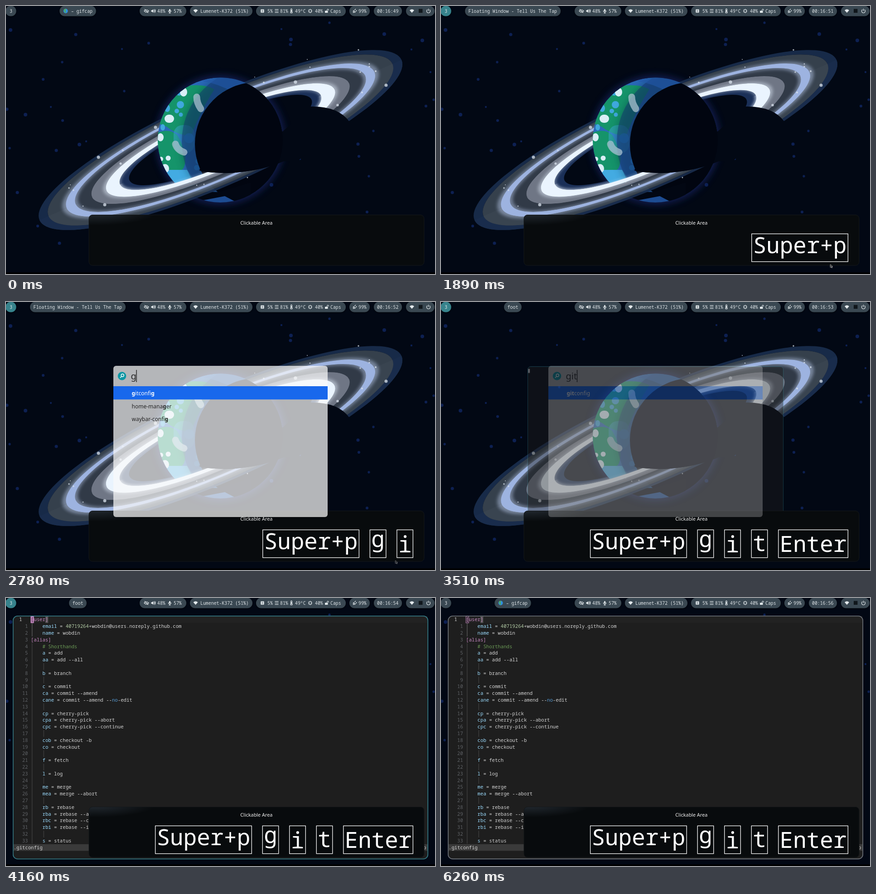
An HTML page for the animation above (6.34 s loop, 947 by 592 pixels).

```html
<!DOCTYPE html>
<html lang="en">
<head>
<meta charset="utf-8">
<title>Launcher demo</title>
<style>
  html, body { margin: 0; width: 100%; height: 100%; overflow: hidden; background: #020713; }
  svg { display: block; width: 947px; height: 592px; }
  text { white-space: pre; }
  .bar { font: 9.9px "Noto Sans Mono", monospace; fill: #dfe5e8; }
  .pill { fill: #3a4852; filter: drop-shadow(0 1px 1.5px #0009); }
  .icon { fill: none; stroke: #e3e9ec; stroke-width: 1.2; }
  .solid { fill: #e3e9ec; stroke: none; }
  .code { font: 10.67px "Noto Sans Mono", monospace; fill: #d4d4d4; }
  .key { font: 49.2px "Noto Sans Mono", monospace; fill: #fff; }
  .sans { font-family: "Noto Sans", sans-serif; }
  #editor { transform-origin: 473.5px 308px; }
</style>
</head>
<body>
<svg id="stage" viewBox="0 0 947 592" xmlns="http://www.w3.org/2000/svg">
  <defs>
    <filter id="soft" x="-30%" y="-30%" width="160%" height="160%"><feGaussianBlur stdDeviation="9"/></filter>
    <filter id="haze" x="-10%" y="-30%" width="120%" height="160%"><feGaussianBlur stdDeviation="3.5"/></filter>
    <clipPath id="disc"><circle cx="473" cy="296" r="138"/></clipPath>
    <clipPath id="near"><rect x="-450" y="0" width="900" height="120"/></clipPath>
    <path id="shade" d="M427 363Q437 368 490 369Q560 366 613 343L640 345L759 257Q735 221 672 222L611 277L480 260Z"/>
    <radialGradient id="sheen" gradientUnits="userSpaceOnUse" cx="195" cy="458" r="135" gradientTransform="translate(0 366) scale(1 .2)">
      <stop offset="0" stop-color="#232a31"/><stop offset="1" stop-color="#232a31" stop-opacity="0"/>
    </radialGradient>
  </defs>

  <g id="wallpaper">
    <rect width="947" height="592" fill="#020814"/>
    <g id="stars" fill="#0d2052"/>
    <circle cx="473" cy="296" r="141" fill="#1b2a78" opacity=".7" filter="url(#soft)"/>
    <g id="far" transform="translate(473.5 296) rotate(-23.9)"/>
    <g clip-path="url(#disc)">
      <circle cx="473" cy="296" r="138" fill="#2a69b8"/>
      <path d="M335 260Q365 180 400 176Q440 172 460 184Q430 230 408 288Q380 284 362 272Q350 262 335 260Z" fill="#15946a"/>
      <path d="M330 282Q360 268 378 285Q405 330 392 358Q380 374 360 366Q342 350 330 330Z" fill="#15946a"/>
      <path d="M340 362L400 362L440 420L370 400Z" fill="#43abe2"/>
      <g fill="#3fa8de">
        <circle cx="385" cy="218" r="8"/><circle cx="377" cy="232" r="5"/><circle cx="386" cy="240" r="4.5"/>
        <ellipse cx="356" cy="226" rx="6" ry="8"/><ellipse cx="346" cy="268" rx="5" ry="7"/><circle cx="382" cy="192" r="6"/>
        <rect x="370" y="263" width="46" height="62" rx="20" opacity=".45"/>
      </g>
      <circle cx="553" cy="300" r="166" fill="#08303f" opacity=".4" filter="url(#soft)"/>
      <circle cx="553" cy="300" r="165" fill="#11346f" opacity=".5"/>
      <path d="M434 166Q470 150 550 168V190H500Q470 172 434 166Z" fill="#2258a8" opacity=".6"/>
      <g fill="#1b5693" opacity=".7">
        <circle cx="404" cy="292" r="11"/><circle cx="424" cy="343" r="6"/><circle cx="421" cy="357" r="6"/>
      </g>
      <g fill="#d9eef6">
        <ellipse cx="392" cy="190" rx="8" ry="10"/><rect x="350" y="240" width="21" height="18" rx="9"/>
        <ellipse cx="341" cy="290" rx="7" ry="9"/><circle cx="358" cy="336" r="5.5"/>
        <ellipse cx="351" cy="359" rx="9" ry="10"/><circle cx="342" cy="338" r="5"/>
      </g>
      <g fill="none" stroke="#a9c0cf" stroke-linecap="round" stroke-width="15" opacity=".75">
        <path d="M421 201Q421 214 430 227"/><path d="M374 305Q378 318 393 323"/>
      </g>
      <circle cx="554" cy="305" r="137" fill="#010510"/>
      <path d="M370 409L470 411L540 390V450H370Z" fill="#020713"/>
      <path d="M425 431L483 420L508 433Q470 444 425 431Z" fill="#1d4c92"/>
    </g>
    <g id="front" clip-path="url(#near)" transform="translate(473.5 296) rotate(-23.9)"/>
    <use href="#shade" fill="#020814"/>
    <use href="#shade" fill="#010510" clip-path="url(#disc)"/>
    <g id="moons" fill="#dbe4ee"/>
    <rect y="588.5" width="947" height="4" fill="#000"/>
  </g>

  <g id="editor">
    <rect x="15.8" y="39.8" width="915.4" height="536.6" rx="10" fill="#1e1e1e"/>
    <rect id="boot" x="17" y="48" width="6.4" height="14.5" fill="#ccc"/>
    <g id="buffer" class="code"></g>
    <rect id="frame" x="15.8" y="39.8" width="915.4" height="536.6" rx="10" fill="none" stroke-width="1.6"/>
  </g>

  <g id="bar" class="bar"></g>

  <rect x="183" y="461.5" width="740" height="111.5" rx="8" fill="#080b0d"/>
  <rect x="183" y="461.5" width="740" height="111.5" rx="8" fill="url(#sheen)" stroke="#15181a"/>
  <text class="sans" x="552.8" y="483" font-size="10.8" text-anchor="middle" fill="#f2f2f2">Clickable Area</text>
  <g id="keys"></g>

  <g id="launcher" class="sans">
    <rect x="237" y="141" width="473" height="334" rx="6" fill="#fafafa" fill-opacity=".72"/>
    <circle cx="256" cy="163.5" r="9.3" fill="#0c96a4"/>
    <g fill="none" stroke="#fff" stroke-width="1.4"><circle cx="257.2" cy="162" r="3"/><path d="M255 164.4L251.8 167.6"/></g>
    <g id="results"></g>
  </g>

  <path id="mouse" d="M0 0V6.5L1.7 5L3 7.5L4.2 7L3 4.6H5Z" fill="#111" stroke="#ddd" stroke-width=".8"/>
</svg>

<script>
const LOOP = 6340;
const $ = id => document.getElementById(id);

// Wallpaper
const stars = [608,51, 629,74, 628,85, 315,82, 124,124, 256,95, 10,53, 154,63, 82,162, 261,188,
  99,223, 43,240, 2,228, 125,253, 8,314, 177,299, 162,306, 111,319, 927,221, 944,207, 937,146,
  919,76, 777,305, 779,332, 811,276, 649,338, 586,395, 25,412, 797,455, 801,376, 895,96, 835,62,
  118,524, 70,486, 714,37];
const moons = [204,334,3.5, 218,439,3.5, 330,268,3.5, 639,168,3.7, 839,175,3.5, 732,219,2.8, 569,169,2,
  816,144,2, 782,146,1.7, 786,191,2, 802,128,1.4, 802,134,1.8, 778,97,1.7, 549,157,1, 253,348,2.6,
  258,319,1.8, 142,395,1, 139,402,1.7, 149,407,1.7, 170,442,1.3, 437,394,1.4, 421,396,1.3,
  408,389,1, 533,379,1.4, 671,135,1.3, 665,118,1];
const dot = (x, y, r) => `<circle cx="${x}" cy="${y}" r="${r}"/>`;

let dots = '';
for (let i = 0; i < stars.length; i += 2) dots += dot(stars[i], stars[i + 1], 2.2 + i * 7 % 5 * .45);
$('stars').innerHTML = dots;
dots = '';
for (let i = 0; i < moons.length; i += 3) dots += dot(moons[i], moons[i + 1], moons[i + 2]);
$('moons').innerHTML = `<g opacity=".75">${dots}</g>`;

const oval = k => {
  const a = 437 * k, b = 98.7 * k;
  return `M${-a} 0A${a} ${b} 0 1 1 ${a} 0A${a} ${b} 0 1 1 ${-a} 0Z`;
};
const band = (outer, inner, fill, more = '') =>
  `<path d="${oval(outer)}${oval(inner)}" fill-rule="evenodd" fill="${fill}" ${more}/>`;
const rings = band(1, .95, '#1a2d4d', 'opacity=".92"') + band(.95, .85, '#3a4551', 'opacity=".92"') +
  band(.8, .71, '#313a47') + band(.71, .63, '#6f7685') +
  band(.87, .785, '#a9b9d8', 'opacity=".55" filter="url(#haze)"') + band(.645, .55, '#dfeaf8', 'opacity=".5" filter="url(#haze)"') +
  band(.85, .8, '#9db3e0') + band(.63, .555, '#eaf4fe');
$('far').innerHTML = band(.555, .503, '#1a2f57') + rings;
$('front').innerHTML = rings;

// Top bar
const CH = 5.94;
const pill = (x, right, more = '') =>
  `<rect class="pill" x="${x}" y="-.3" width="${right - x}" height="22.8" rx="11.3" ${more}/>`;
const label = (x, s) => `<text x="${x}" y="14.6">${s}</text>`;
const line = (x, d, cls = '') => `<path class="icon ${cls}" transform="translate(${x} 11)" d="${d}"/>`;
const wifi = x => line(x, 'M-5 -1.5Q0 -6 5 -1.5L0 4Z', 'solid');
const bolt = 'M-4 4L-2 2M-2.5 -1L1 2.5Q-1 4 -2.8 2.2T-2.5 -1ZM-.5 -2L2 -4.5M2 1L4.5 -1.5';

$('bar').innerHTML =
  pill(-1, 22.5, 'id="space"') + label(8, '3') + '<g id="title"></g>' +
  pill(295, 398) + line(310, 'M-5 0Q0 -5.5 5 0Q0 5.5 -5 0ZM-4 -4L4 4M-1 0H1.5') +
  line(325, 'M-4.5 -1.7H-2.2L.5 -4.2V4.2L-2.2 1.7H-4.5Z', 'solid') + line(325, 'M2 -2Q4 0 2 2M3 -4Q6.5 0 3 4') + label(334, '48%') +
  line(361.5, 'M-1.6 -3Q0 -6 1.6 -3V0Q0 2.5 -1.6 0Z', 'solid') + line(361.5, 'M-3 -1Q-3 2.5 0 2.5T3 -1M0 2.5V4.5M-2 4.7H2') + label(370, '57%') +
  pill(406, 544) + wifi(418.5) + label(429, 'Lumenet-K372 (51%)') +
  pill(552, 750) + line(566, 'M-3 -3H3V3H-3ZM-4 -1.5H4M-4 1.5H4M-1.5 -4V4M1.5 -4V4') + label(577, '5%') +
  line(597.5, 'M-4 -3.3H4M-4 0H4M-4 3.3H4') + label(605, '81%') +
  line(630, 'M-1.3 1V-4Q0 -6 1.3 -4V1Q2.8 3 1.3 4.5H-1.3Q-2.8 3 -1.3 1ZM0 -2V3') + label(638, '49°C') +
  line(671.5, 'M-3 0A3 3 0 1 1 3 0A3 3 0 1 1 -3 0M-4.7 0H-3M3 0H4.7M0 -4.7V-3M0 3V4.7M-3.4 -3.4L-2.2 -2.2M2.2 2.2L3.4 3.4M3.4 -3.4L2.2 -2.2M-2.2 2.2L-3.4 3.4') + label(682, '40%') +
  line(708, 'M-4 -.5H2.5V4H-4Z', 'solid') + line(708, 'M.8 0V-2.5Q2.5 -6 4.2 -2.5V-1') + label(716, 'Caps') +
  pill(758, 803) + line(770, bolt) + label(778, '99%') +
  pill(812, 874) + '<text id="clock" x="819" y="14.6"></text>' +
  pill(883, 946) + wifi(896) + '<rect x="911" y="6.5" width="8.5" height="8.5" fill="#10161b"/>' +
  line(932.5, 'M-2.3 -3A4 4 0 1 0 2.3 -3M0 -5V0');

function drawTitle(s) {
  const globe = s.startsWith('–');
  const w = (s.length + (globe ? 3 : 0)) * CH + 15, x = 158.5 - w / 2;
  const icon = `<circle cx="131.7" cy="11" r="4.9" fill="#2f8fe0"/>
    <path d="M128 8Q131 5.5 133 7.5L131 10L132.5 13L131 15.5Q128 12 128 8Z" fill="#4fae5a"/>`;
  $('title').innerHTML = pill(x, x + w) + (globe ? icon : '') + label(x + 7.5 + (globe ? 3 * CH : 0), s);
}

// Editor
const ADV = 6.402, ROW = 14.8, LEFT = 55;
const user = 'wobdin';
const rows = `[user]|email = 40719264+${user}@users.noreply.github.com|name = ${user}|[alias]|# Shorthands|a = add|aa = add --all||b = branch||c = commit|ca = commit --amend|cane = commit --amend --no-edit||cp = cherry-pick|cpa = cherry-pick --abort|cpc = cherry-pick --continue||cob = checkout -b|co = checkout||f = fetch||l = log||me = merge|mea = merge --abort||rb = rebase|rba = rebase --abort|rbc = rebase --continue|rbi = rebase --interactive||s = status`.split('|');
const tint = (s, fill) => `<tspan fill="${fill}">${s}</tspan>`;

function paint(s) {
  if (s[0] === '[') return tint(s, '#c586c0');
  if (s[0] === '#') return tint(s, '#6a9955');
  const [key, value] = s.split(' = ');
  return tint(key, '#9cdcfe') + ' = ' +
    value.replace(/^\d+/, n => tint(n, '#b5cea8')).replace('--no', '--' + tint('no', '#569cd6'));
}

const guide = (x, y, h, c = '#4a4a4a') => `<rect x="${x}" y="${y}" width="1" height="${h}" fill="${c}"/>`;
let buf = '<rect x="55" y="40.6" width="875" height="14.6" fill="#222"/>' +
  guide(57.3, 55.5, 29.5, '#707070') + guide(57.3, 99.5, 443) +
  `<rect x="${LEFT + 5 * ADV}" y="40.6" width="6.4" height="14.6" fill="#515151"/>` +
  '<rect id="caret" x="55" y="40.6" width="6.2" height="14.4" stroke="#c586c0" stroke-width=".9"/>';
rows.forEach((s, i) => {
  const y = 51.4 + ROW * i;
  buf += i ? `<text x="48.6" y="${y}" text-anchor="end" fill="#5f6266">${i}</text>`
           : `<text x="29.2" y="${y}" fill="#d0d0d0">1</text>`;
  if (s) buf += `<text x="${LEFT + (s[0] === '[' ? 0 : 4 * ADV)}" y="${y}">${paint(s)}</text>`;
  else buf += guide(82.8, y - 11, ROW);
});
buf += '<text id="bracket" x="55" y="51.4">[</text>' +
  '<rect x="16.6" y="543.8" width="913.8" height="14.6" fill="#3a3a3a"/>' +
  '<text x="16.8" y="554.8">.gitconfig</text><text x="927.3" y="554.8" text-anchor="end">Top</text>';
$('buffer').innerHTML = buf;

// Pressed keys, right aligned, each glyph run centred on its ink
const baseline = { 'Super+p': 545.5, g: 541, i: 553, t: 550, Enter: 551.7 };
function drawKeys(list) {
  let right = 898.4, out = '';
  for (const k of list.split(' ').filter(Boolean).reverse()) {
    const w = k.length * 29.52 + 6, x = right - w;
    out += `<rect x="${x}" y="503.3" width="${w}" height="61.4" fill="none" stroke="#fff" stroke-width="1.3"/>
      <text class="key" x="${x + 3}" y="${baseline[k]}">${k}</text>`;
    right = x - 24;
  }
  $('keys').innerHTML = out;
}

// Launcher
const entries = ['gitconfig', 'home-manager', 'waybar-config'];
const caretX = { '': 276.5, g: 288, gi: 293.5, git: 300.5 };
function drawResults(q) {
  const hits = entries.filter(e => e.includes(q));
  const mark = e => !q ? e : e.split(q).join(`<tspan font-weight="700">${q}</tspan>`);
  $('results').innerHTML =
    `<text x="275.5" y="171" font-size="20" fill="#2b2b2b">${q}</text>` +
    `<rect x="${caretX[q] - .7}" y="150" width="1.4" height="27" fill="#1c1c1c"/>` +
    '<rect x="237" y="186" width="473" height="29.3" fill="#1868ec"/>' +
    hits.map((e, i) => `<text x="277.5" y="${205.7 + 28.8 * i}" font-size="12" fill="${i ? '#262626' : '#fff'}">${mark(e)}</text>`).join('');
}

// Hard changes: each track is a list of [time, value]
const floating = 'Floating Window - Tell Us The Tap';
const tracks = [
  [drawTitle, [[0, '– gifcap'], [680, floating], [3465, 'foot'], [4980, floating], [5140, '– gifcap']]],
  [s => $('clock').textContent = '00:16:' + s,
    [[0, 49], [180, 50], [1140, 51], [2130, 52], [2940, 53], [4000, 54], [4980, 55], [5940, 56]]],
  [drawKeys, [[0, ''], [1890, 'Super+p'], [2690, 'Super+p g'], [2780, 'Super+p g i'],
    [2940, 'Super+p g i t'], [3440, 'Super+p g i t Enter']]],
  [drawResults, [[0, ''], [2780, 'g'], [2940, 'gi'], [3020, 'git']]],
  [on => { $('buffer').style.display = on ? '' : 'none'; $('boot').style.display = on ? 'none' : ''; },
    [[0, false], [3640, true]]],
  [solid => {
    $('caret').setAttribute('fill', solid ? '#c586c0' : 'none');
    $('bracket').setAttribute('fill', solid ? '#1e1e1e' : '#c586c0');
  }, [[0, true], [5380, false]]],
  [o => $('mouse').style.opacity = o, [[0, 0], [680, 1], [2130, .65], [3440, 0]]],
];

// Smooth changes: [time, value, easing to the next point]
const POP = 'cubic-bezier(.05,.9,.1,1.05)', FADE = 'cubic-bezier(0,.75,.15,1)';
function tween(id, prop, pts) {
  const all = [[0, pts[0][1]], ...pts, [LOOP, pts[pts.length - 1][1]]];
  const a = $(id).animate(all.map(([t, v, easing = 'linear']) => ({ offset: t / LOOP, [prop]: v, easing })),
    { duration: LOOP, iterations: Infinity });
  a.pause();
  return a;
}
const GREY = '#3a4852', TEAL = '#37838c';
const tweens = [
  tween('editor', 'transform', [[3464.5, 'scale(0)', POP], [4164.5, 'scale(1)']]),
  tween('editor', 'opacity', [[3464, 0], [3510, .43], [3600, .76], [3760, .945], [4160, 1]]),
  tween('launcher', 'opacity', [[2050, 0, FADE], [2750, 1], [3440, 1, FADE], [4140, 0]]),
  tween('space', 'fill', [[680, GREY], [980, TEAL], [5120, TEAL], [5220, GREY]]),
  tween('frame', 'stroke', [[5120, '#36818c'], [5220, '#70757c']]),
  tween('mouse', 'transform', [[680, 'translate(909px,588px)', 'ease-out'], [980, 'translate(859.5px,571px)']]),
];

const shown = [];
const start = performance.now();
function render() {
  const t = Math.max(0, performance.now() - start) % LOOP;
  tweens.forEach(a => a.currentTime = t);
  tracks.forEach(([draw, steps], i) => {
    let n = 0;
    while (n + 1 < steps.length && steps[n + 1][0] <= t) n++;
    if (shown[i] !== n) draw(steps[shown[i] = n][1]);
  });
  requestAnimationFrame(render);
}
render();
</script>
</body>
</html>
```
